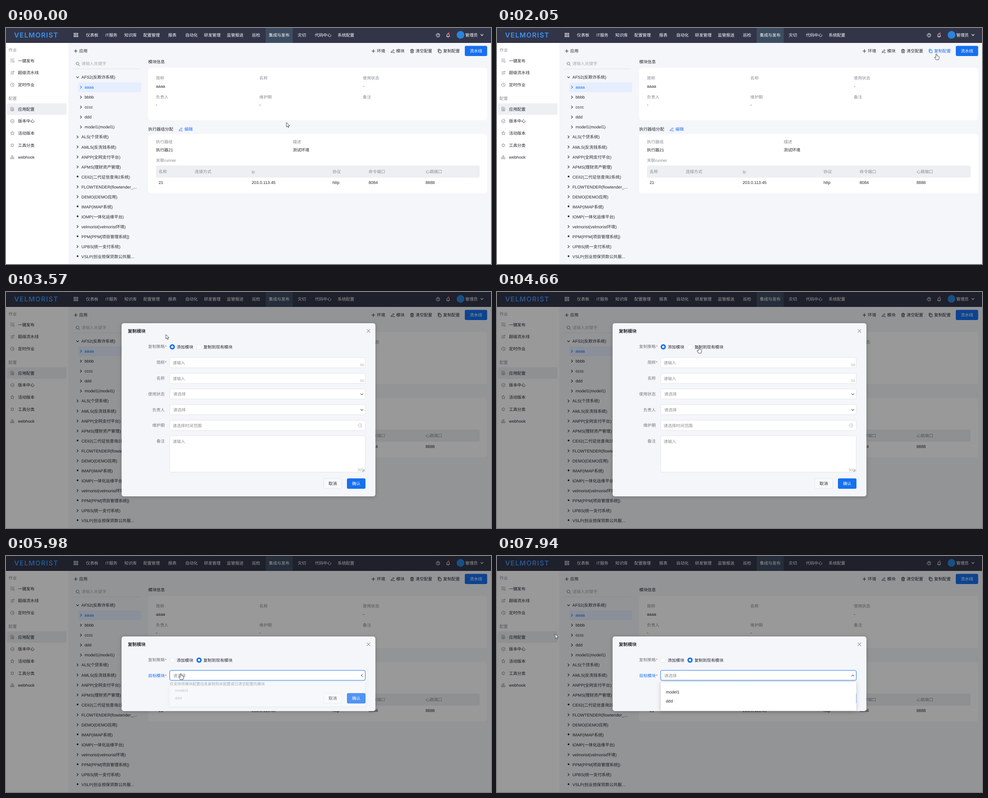
Write an HTML page that moves like this. It is 1074 px wide and 522 px high and loops after 8 s.

```html
<!DOCTYPE html>
<html lang="zh-CN">
<head>
<meta charset="utf-8">
<title>复制模块</title>
<style>
  html, body { margin: 0; width: 100%; height: 100%; overflow: hidden; background: #f5f6fa; }
  svg { display: block; width: 100vw; height: 100vh; }
  text {
    font: 9.2px "Liberation Sans", "Noto Sans CJK SC", "Noto Sans CJK", sans-serif;
    text-rendering: geometricPrecision;
    white-space: pre;
  }
  .modal { filter: drop-shadow(0 1px 4px rgba(0, 0, 0, .22)); }
</style>
</head>
<body>
<svg id="stage" viewBox="0 0 1074 522" xmlns="http://www.w3.org/2000/svg"></svg>
<script>
const INK = '#25282e', GRAY = '#8b8d92', PALE = '#a9abb0', BLUE = '#1670f0', LINE = '#e3e5ea', BG = '#f5f6fa';

const text = (x, cy, s, fill = INK, extra = '') =>
  `<text x="${x}" y="${cy + 3.4}" fill="${fill}" ${extra}>${s}</text>`;
const rect = (x, y, w, h, fill, r = 0, stroke = 'none') =>
  `<rect x="${x}" y="${y}" width="${w}" height="${h}" rx="${r}" fill="${fill}" stroke="${stroke}"/>`;
const dot = (x, y, r, fill, stroke = 'none') =>
  `<circle cx="${x}" cy="${y}" r="${r}" fill="${fill}" stroke="${stroke}"/>`;
const icon = (x, y, d, color = INK, w = 1) =>
  `<path transform="translate(${x} ${y})" d="${d}" fill="none" stroke="${color}" stroke-width="${w}" stroke-linecap="round" stroke-linejoin="round"/>`;

const ring = 'M-4 0a4 4 0 1 0 8 0a4 4 0 1 0-8 0';
const shape = {
  right: 'M-1.4-2.6L1.4 0L-1.4 2.6',
  down: 'M-2.6-1.4L0 1.4L2.6-1.4',
  plus: 'M-3.5 0H3.5M0-3.5V3.5',
  pencil: 'M-3 1.2L1.5-3.3L3.2-1.6L-1.3 2.9L-3.4 3.2ZM0.5 3.7H4',
  trash: 'M-3.7-2.6H3.7M-1.3-2.8V-4H1.3V-2.8M-2.8-2.4V3.8H2.8V-2.4M-1-.5V2M1-.5V2',
  copy: 'M-1.5-2H3.3V4H-1.5ZM-3.4 1.8V-4H1',
  search: 'M-4-1a3.2 3.2 0 1 0 6.4 0a3.2 3.2 0 1 0-6.4 0M1.6 1.5L4.4 4.3',
  cross: 'M-3.5-3.5L3.5 3.5M3.5-3.5L-3.5 3.5',
  clock: ring + 'M0-2V.3L1.8 1.2',
  tasks: 'M-4-3.5H4M-4-.5H0M-4 2.5H-1M2.2-.5a2 2 0 1 0 .1 0M3.5 3L4.3 4',
  loop: 'M4-2.6H-2.4a1.6 1.6 0 0 0 0 2.8H2.4a1.5 1.5 0 0 1 0 2.8H-4M2.8-4L4.2-2.6L2.8-1.2',
  doc: 'M-3-4H1L3-2V4H-3ZM-1.4-1H1.4M-1.4 .6H1.4M-1.4 2.2H1.4',
  badge: ring + 'M-2-1L0 1.8L2-1',
  star: 'M0-4L1.2-1.3L4.1-1L2 1L2.6 3.9L0 2.4L-2.6 3.9L-2-1L-4.1-1L-1.2-1.3Z',
  gear: 'M-2.6 0a2.6 2.6 0 1 0 5.2 0a2.6 2.6 0 1 0-5.2 0M0-4V-3M0 3V4M-3.6-2L-2.7-1.5M2.7 1.5L3.6 2M-3.6 2L-2.7 1.5M2.7-1.5L3.6-2',
  cubes: 'M-1.4-3.6H1.4V-1H-1.4ZM-3.8 .6H-1V3.4H-3.8ZM1 .6H3.8V3.4H1Z',
  bell: 'M-3.6 2.4H3.6L2.6 1V-1a2.6 2.6 0 0 0-5.2 0V1ZM-.8 4H.8',
  help: ring + 'M-1.2-1a1.2 1.2 0 1 1 1.7 1Q0 .3 0 .8M0 2.2V2.3'
};

function header() {
  const nav = { 仪表板: 177, IT服务: 220, 知识库: 262, 配置管理: 304, 报表: 359, 自动化: 397, 研发管理: 438.5,
    监管报送: 489, 巡检: 544.5, 集成与发布: 582, 灾切: 646, 代码中心: 684, 系统配置: 734.5 };
  let s = rect(0, 0, 1074, 33, '#323548') + rect(575, 0, 60, 33, '#3d4d61');
  s += text(18, 17.2, 'VELMORIST', '#3f93ee', 'style="font:600 15px Inter,sans-serif;letter-spacing:1.2px"');
  for (let i = 0; i < 9; i++) s += rect(150 + i % 3 * 3.6, 11 + (i / 3 | 0) * 3.4, 2.4, 2.2, '#fff');
  for (const name in nav) s += text(nav[name], 15.5, name, '#fff');
  return s + icon(956.5, 16, shape.help, '#fff') + icon(979, 16.3, shape.bell, '#fff') + dot(980.5, 11.5, 1.8, '#f0443c') +
    dot(1006.5, 15.3, 8.5, '#2b84dc') + text(1017, 15.5, '管理员', '#fff') + icon(1054, 15.5, shape.down, '#fff', 1.2);
}

function sidebar() {
  const items = [['一键发布', 72.3, 'tasks'], ['超级流水线', 99, 'loop'], ['定时作业', 125.7, 'clock'], ['应用配置', 179.2, 'doc'],
    ['版本中心', 206, 'badge'], ['活动版本', 232.6, 'star'], ['工具分类', 259.4, 'gear'], ['webhook', 286, 'cubes']];
  return rect(0, 33, 138, 489, '#fff') + rect(2, 166.5, 132, 25.5, '#eeeff3', 4) +
    text(5.5, 49, '作业', GRAY) + text(5.5, 156, '配置', GRAY) +
    items.map(([name, y, kind]) => icon(14, y, shape[kind], '#85878c', .9) + text(26.5, y, name)).join('');
}

// Leading mark: v open, > child, + closed, * leaf
function tree() {
  const rows = ['vAFS2(反欺诈系统)', '>aaaa', '>bbbb', '>cccc', '>ddd', '>model1(model1)', '+ALS(个贷系统)', '+AMLS(反洗钱系统)',
    '+ANPP(全网支付平台)', '+APMS(理财资产管理)', '*CEII2(二代征信查询2系统)', '+FLOWTENDER(flowtender_...', '+DEMO(DEMO应用)',
    '*IMAP(IMAP系统)', '*IOMP(一体化运维平台)', '+velmorist(velmorist环境)', '*PPM(PPM[项目管理系统])', '+UPBS(统一支付系统)',
    '*VSLP(创业担保贷款公共服...'];
  let s = icon(154.5, 51, shape.plus) + text(162, 51, '应用') + icon(159, 79.5, shape.search, '#777') +
    text(167, 79, '请输入关键字', PALE) + rect(149, 90, 147, 1, LINE) + rect(160, 120.5, 139.5, 21.5, '#e5eeff', 3);
  rows.forEach((row, i) => {
    const y = 108.9 + 22.03 * i, kind = row[0], child = kind === '>', color = i === 1 ? BLUE : INK;
    s += kind === '*' ? dot(158.5, y - .8, 1.9, INK)
      : icon(child ? 166 : 158.5, y, kind === 'v' ? shape.down : shape.right, color, 1.1);
    s += text(child ? 174 : 167, y, row.slice(1), color);
  });
  return s;
}

function content() {
  const tool = (x, kind, name) => icon(x, 51, shape[kind], 'currentColor') + text(x + 7.8, 51, name, 'currentColor');
  const labels = (y, set) => Object.entries(set).map(([s, x]) => text(x, y, s, GRAY)).join('');
  const values = (y, set) => set.map(([x, s]) => text(x, y, s)).join('');
  return `<g color="${INK}">` + tool(813.5, 'plus', '环境') + tool(856.3, 'pencil', '模块') + tool(899.2, 'trash', '清空配置') +
    `<g id="copy">${tool(960.3, 'copy', '复制配置')}</g></g>` +
    rect(1016, 39.5, 49.5, 22.5, BLUE, 3) + text(1027, 51, '流水线', '#fff') +
    text(315, 74.5, '模块信息') + rect(315, 88, 750.5, 116, '#fff', 6) +
    labels(111, { 简称: 332, 名称: 561, 使用状态: 790 }) + values(128.7, [[332, 'aaaa'], [790.5, '-']]) +
    labels(152.3, { 负责人: 332, 维护期: 561, 备注: 790 }) + values(170, [[332, '-'], [561, '-']]) +
    text(315, 223.5, '执行器组分配') + icon(387, 224, shape.pencil, BLUE) + text(395, 223.5, '编辑', BLUE) +
    rect(315, 234.5, 750.5, 131.5, '#fff', 6) +
    labels(252, { 执行器组: 332, 描述: 635 }) + values(269.3, [[332, '执行器21'], [635, '测试环境']]) +
    labels(293, { 关联runner: 332 }) + rect(332, 304, 717, 27, '#eeeff3', 4) +
    labels(317.8, { 名称: 338, 连接方式: 418, ip: 544, 协议: 723, 命令端口: 803, 心跳端口: 929 }) +
    values(342, [[338, '21'], [544, '203.0.113.45'], [723, 'http'], [803, '8084'], [929, '8888']]);
}

const label = (cy, s, star, id = '') =>
  text(351.5, cy, s, '#77797e', `text-anchor="end" ${id}`) + (star ? text(352, cy, '*', '#c4605c') : '');
const box = (y, h, id = '') => `<g ${id} stroke="${LINE}">${rect(362.5, y, 433, h, '#fff', 3, 'inherit')}</g>`;

function frame(top, height, body) {
  const cy = top + 52.3, foot = top + height - 39.3;
  const radio = (x, name, cls) => dot(x, cy, 5.5, '#fff', LINE) +
    `<g class="${cls}">${dot(x, cy, 5.8, BLUE)}${dot(x, cy, 2.5, '#fff')}</g>` + text(x + 9.7, cy, name);
  return `<g class="modal">${rect(256, top, 562, height, BG, 5)}</g>` +
    text(269.7, top + 17.8, '复制模块', INK, 'style="font-size:9.9px;font-weight:700"') +
    icon(802.7, top + 17.3, shape.cross, '#666') + label(cy - .6, '复制策略', true) +
    radio(368.2, '添加模块', 'add') + radio(427.5, '复制到现有模块', 'existing') +
    rect(703.5, foot, 40, 22, '#f8f9fb', 3, LINE) + text(723.5, foot + 11, '取消', INK, 'text-anchor="middle"') +
    rect(755, foot - .5, 41, 23, BLUE, 3) + text(775.5, foot + 11, '确认', '#fff', 'text-anchor="middle" font-weight="500"') + body;
}

function addForm() {
  const count = (x, y, s) => text(x, y, s, PALE, 'text-anchor="end" style="font-size:8px"');
  const field = (y, name, hint, star) => label(y + 11, name, star) + box(y, 22.5) + text(369, y + 11.3, hint, GRAY);
  const select = (y, name) => label(y + 11.5, name) + box(y, 22.5) + text(370.3, y + 11.2, '请选择', GRAY) +
    icon(788, y + 11.8, shape.down, '#555', 1.1);
  return field(145, '简称', '请输入', true) + count(793, 161, '50') + field(180, '名称', '请输入') + count(793, 196, '50') +
    select(214.3, '使用状态') + select(249, '负责人') +
    field(284, '维护期', '请选择时间范围') + icon(784, 295, shape.clock, PALE, .8) +
    label(330, '备注') + box(318, 80.5) + text(369, 331, '请输入', GRAY) + count(792, 392.3, '500') +
    icon(791.5, 394.8, 'M-2.5 2.5L2.5-2.5M0 2.5L2.5 0', '#555', .8);
}

function copyForm() {
  return label(265, '目标模块', true, 'id="target"') + box(253, 22, 'id="select"') + text(370.3, 264.2, '请选择', GRAY) +
    `<g transform="translate(788 264.3)"><g id="caret">${icon(0, 0, shape.down, '#555', 1.1)}</g></g>` +
    text(362.5, 282.3, '仅支持将模块配置信息复制到未配置或已清空配置的模块', GRAY, 'style="font-size:8.44px"') +
    `<g transform="translate(0 278.8)"><g id="menu"><g class="modal">${rect(362.5, 0, 433, 63.5, '#fff', 3)}</g>` +
    text(374, 21.5, 'model1') + text(374, 41.8, 'ddd') + '</g></g>';
}

const stage = document.getElementById('stage');
stage.innerHTML = rect(0, 0, 1074, 522, BG) + sidebar() + header() + tree() + content() +
  `<g id="mask">${rect(0, 0, 1074, 522, 'rgba(0,0,0,.4)')}</g>
  <g id="large">${frame(69, 383, addForm())}</g><g id="small">${frame(178, 165, copyForm())}</g>
  <g id="cursor" stroke="#222" stroke-width=".8" stroke-linejoin="round" fill="#fff">
    <path id="arrow" d="M0 0V9.8L2.3 7.7L3.9 11.2L5.5 10.5L4 7.2H7Z"/>
    <path id="hand" d="M-1.2 .8Q0-.8 1.2 .8V4.6Q2.3 4 3 5Q4 4.5 4.6 5.5Q5.8 5.2 6 6.6V10L4.9 13.3H-.9L-3.8 8.6Q-3.9 7-2.6 7.3L-1.2 8.6Z"/>
  </g>`;

const $ = id => document.getElementById(id);
const show = (id, on) => $(id).style.display = on ? '' : 'none';
const within = (t, a, b) => t >= a && t < b;

// Number of updates already shown in a run of n updates between times a and b
const updates = (t, a, b, n) => t < a ? 0 : t >= b ? n : 1 + Math.floor((t - a) / (b - a) * (n - 1));
const ease = p => (1 - Math.cos(Math.PI * p)) / 2;

const moves = [
  [420, 1180, 11, 943, 106], [1270, 1670, 6, 973, 57], [2270, 3050, 11, 640, 229],
  [3130, 3570, 6, 354, 94], [3650, 3730, 2, 321, 98], [3800, 3880, 2, 383, 106],
  [3960, 4510, 8, 447, 122], [5130, 5890, 11, 387, 260], [6120, 6540, 6, 383, 308],
  [6690, 6930, 4, 382, 322], [7180, 7480, 5, 203, 180], [7630, 7630, 1, 200, 178],
  [7860, 7860, 1, 165, 169], [7940, 7940, 1, 129, 172.5]
];

function pointer(t) {
  let x = 621, y = 209;
  for (const [a, b, n, toX, toY] of moves) {
    const p = ease(updates(t, a, b, n) / n);
    x += (toX - x) * p;
    y += (toY - y) * p;
    if (p < 1) break;
  }
  return [x, y];
}

function draw(now) {
  const t = now % 8000, open = t >= 5980;
  show('mask', t >= 2130);
  show('large', within(t, 2130, 4740));
  show('small', t >= 4740);

  const hand = within(t, 1590, 2130) || within(t, 4040, 4740) || within(t, 5800, 7180);
  show('arrow', !hand);
  show('hand', hand);
  $('cursor').setAttribute('transform', `translate(${pointer(t)})`);
  $('copy').setAttribute('color', within(t, 1590, 2130) ? BLUE : INK);

  const picked = updates(t, 4820, 4970, 3) / 3;
  stage.querySelectorAll('.add').forEach(e => e.style.opacity = 1 - picked);
  stage.querySelectorAll('.existing').forEach(e => e.style.opacity = picked);

  const grow = updates(t, 5980, 6190, 4) / 4;
  show('menu', open);
  $('menu').style.opacity = grow;
  $('menu').setAttribute('transform', `scale(1 ${.8 + .2 * grow})`);
  $('caret').setAttribute('transform', `rotate(${180 * Math.sqrt(grow)})`);
  $('target').setAttribute('fill', open ? BLUE : '#77797e');
  $('select').setAttribute('stroke', open ? BLUE : LINE);
}

const start = performance.now();
function tick() {
  draw(performance.now() - start);
  requestAnimationFrame(tick);
}
tick();
</script>
</body>
</html>
```
